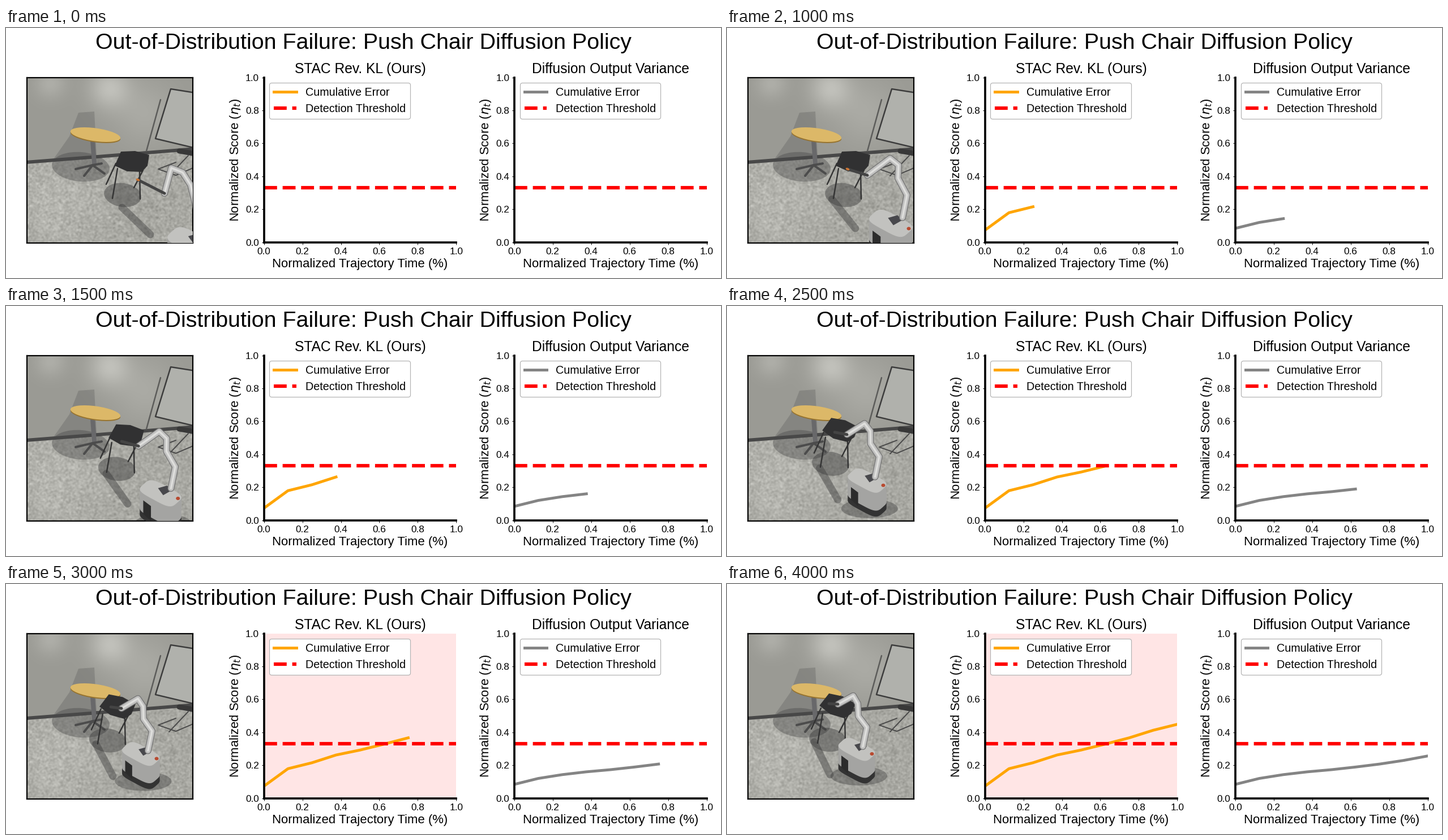
A matplotlib script for the animation above (6500 ms loop, 1263x443 px).

```python
import numpy as np
import matplotlib.pyplot as plt
from matplotlib.animation import FuncAnimation
from matplotlib.patches import Ellipse, Polygon

W, H, DPI = 1263, 443, 128
PX = 72 / DPI          # points per pixel
U = 1.232 * PX         # unit for fonts and plot lines
STEPS, FRAMES = 8, 13
THRESHOLD = 0.332

plt.rcParams["font.family"] = "Liberation Sans"
fig = plt.figure(figsize=(W / DPI, H / DPI), dpi=DPI, facecolor="white")
fig.suptitle("Out-of-Distribution Failure: Push Chair Diffusion Policy",
             x=0.5, y=0.98, fontsize=32 * U)


def add_axes(x, y, w, h):
    return fig.add_axes([x / W, 1 - (y + h) / H, w / W, h / H])


# ---------- score plots ----------
def score_plot(x, title, color):
    ax = add_axes(x, 87.5, 339.8, 292.4)
    ax.set(xlim=(0, 1), ylim=(0, 1))
    ax.set_title(title, fontsize=20 * U, pad=6 * U)
    ax.set_xlabel("Normalized Trajectory Time (%)", fontsize=18 * U, labelpad=4 * U)
    ax.set_ylabel(r"Normalized Score ($\eta_t$)", fontsize=18 * U, labelpad=4 * U)
    ax.tick_params(labelsize=14 * U, length=3.5 * U, width=0.8 * U, pad=3.5 * U)
    ax.spines[["top", "right"]].set_visible(False)
    ax.spines[["left", "bottom"]].set_linewidth(3 * U)
    curve, = ax.plot([], [], color=color, lw=4 * U, label="Cumulative Error")
    ax.axhline(THRESHOLD, color="red", ls="--", lw=5 * U, label="Detection Threshold")
    legend = ax.legend(loc="upper left", fontsize=16 * U, edgecolor="0.7", framealpha=1)
    legend.get_frame().set_linewidth(U)
    alarm = ax.axvspan(0, 1, color="red", alpha=0.1, lw=0, zorder=0.5, visible=False)
    return curve, alarm


TIME = np.linspace(0, 1, STEPS + 1)
STAC = np.array([0.074, 0.180, 0.216, 0.263, 0.293, 0.329, 0.367, 0.413, 0.449])
VARIANCE = np.array([0.085, 0.121, 0.144, 0.161, 0.174, 0.190, 0.208, 0.230, 0.257])
plots = [
    (*score_plot(455.6, "STAC Rev. KL (Ours)", "orange"), STAC),
    (*score_plot(897.8, "Diffusion Output Variance", "#848484"), VARIANCE),
]

# ---------- room, in stage pixels ----------
LEFT, TOP, SIDE = 37.4, 87.6, 293
room = add_axes(LEFT, TOP, SIDE, SIDE)
room.set(xticks=[], yticks=[])
room.spines[:].set_linewidth(2.2 * PX)


def backdrop():
    x, y = np.meshgrid(LEFT + np.arange(SIDE), TOP + np.arange(SIDE))

    def glow(cx, cy, size):
        return np.exp(-((x - cx) ** 2 + (y - cy) ** 2) / size ** 2)

    wall = 154 + 36 * glow(182, 106, 36) + 20 * glow(78, 98, 28) + 16 * glow(245, 150, 58)
    noise = np.random.default_rng(4).normal(0, 2, x.shape)
    for axis in (0, 1):
        noise = sum(np.roll(noise, k, axis) for k in range(4))
    floor = 168 + noise + 14 * glow(90, 310, 80)
    v = np.where(y < 238 - (x - LEFT) / 12, wall, floor)
    return np.clip(np.stack([v, v, v - 6], -1), 0, 255).astype(np.uint8)


room.imshow(backdrop(), extent=(LEFT, LEFT + SIDE, TOP + SIDE, TOP), aspect="auto", zorder=0)
room.set(xlim=(LEFT, LEFT + SIDE), ylim=(TOP + SIDE, TOP))


def poly(points, color, z=2, **kw):
    return room.add_patch(Polygon(points, fc=color, lw=0, zorder=z, **kw))


def oval(x, y, w, h, color, angle=0, z=2, **kw):
    return room.add_patch(Ellipse((x, y), w, h, angle=angle, fc=color,
                                  lw=0, zorder=z, **kw))


def stroke(points, color, width, z=2, **kw):
    line, = room.plot(*np.transpose(points), color=color, lw=width * PX, zorder=z,
                      solid_capstyle="round", solid_joinstyle="round", **kw)
    return line


# baseboard and table shadow
stroke([(35, 238), (150, 229), (335, 214)], "#484848", 6, 1)
poly([(128, 150), (156, 148), (160, 226), (84, 232), (112, 192)], "#505050", 1, alpha=0.28)
oval(132, 246, 102, 52, "#484848", 5, 1, alpha=0.4)

# table
stroke([(153, 200), (156, 240)], "#68686a", 8)
for foot in [(123, 250), (138, 262), (174, 258), (169, 240)]:
    stroke([(153, 243), foot], "#4c4c4c", 4)
for y, color in [(191, "#96732f"), (189, "#dcb868")]:
    oval(158, y, 89, 23, color, 8, 3)

# screen, pole and stand
stroke([(273, 127), (248, 218)], "#5c5c5a", 2.5)
poly([(291, 108), (335, 115), (335, 213), (264, 196)], "#b0b1ac")
stroke([(335, 115), (291, 108), (264, 196), (335, 213)], "#3c3c3c", 2.5)
stroke([(306, 218), (335, 223)], "#383838", 9)
stroke([(322, 226), (288, 262)], "#4a4a4a", 2)
stroke([(300, 238), (269, 250), (300, 261), (335, 246)], "#4a4a4a", 2)

# ---------- moving parts ----------
DIM = "#3c3c3c"
chair_shade = oval(0, 0, 66, 42, DIM, 8, alpha=0.45)
robot_shade = stroke([(0, 0)], DIM, 13, alpha=0.45)
base_shade = oval(0, 0, 100, 34, DIM, alpha=0.4)

CHAIR = np.array([206, 296])
SEAT = np.array([(203, 219), (228, 218), (253, 225), (250, 244), (240, 255),
                 (214, 254), (192, 244)])
LEGS = np.array([[(194, 240), (177, 277)], [(197, 249), (188, 302)],
                 [(236, 254), (237, 303)], [(242, 252), (226, 283)]])
legs = [stroke(leg, "#333333", 2.4, 4) for leg in LEGS]
seat = poly(SEAT, "#313132", 5)

# robot base: one rounded outline stacked downwards, lid first
DEPTH = 40
angle = np.linspace(0, 2 * np.pi, 60)
a, b = (1.1 * np.sign(w) * np.abs(w) ** 0.5 for w in (np.cos(angle), np.sin(angle)))
OUTLINE = np.stack([24 * a + 10 * b, 13 * a - 9 * b - 22], -1)
base = []
for drop in range(0, DEPTH + 1, 2):
    color = "#c2c2bf" if drop == 0 else "#a4a4a2" if drop < 31 else "#333333"
    base.append((poly(OUTLINE, color, 7 - drop / 100), OUTLINE + (0, drop)))
for points, color in [([(-27, -11), (-15, -2), (-15, 21), (-27, 10)], "#2c2c2c"),
                      ([(-4, -30), (10, -34), (18, -27), (4, -19)], "#48484c")]:
    base.append((poly(points, color, 7.1), np.array(points)))
button = oval(0, 0, 7, 6, "#b84a30", z=7.2)

# arm from gripper tip to foot: at rest by the table, reaching, and folded at the start
REST = [(180, 212), (196, 213), (223, 198), (231, 212), (232, 234), (247, 254), (240, 288)]
REACH = [(213, 250), (248, 261), (288, 231), (303, 243), (302, 266), (318, 296), (310, 336)]
FOLDED = [(233, 269), (280, 293), (292, 248), (312, 256), (326, 278), (334, 310), (340, 345)]
arm_lines = [stroke(REST, color, width, 8) for color, width in
             [("#737373", 12), ("#c0c0bf", 9.5), ("#dededc", 3.5)]]
gripper = stroke(REST[:2], "#444444", 5, 8)
tip = oval(0, 0, 7, 4, "#cc7433", 25, 9)


def mix(p, q, t):
    return np.array(p) * (1 - t) + np.array(q) * t


def away(step):
    """How far the robot still is from its end pose, slowing down as it arrives."""
    return (1 - step / STEPS) ** 1.7


def arm_pose(step):
    gap, reach = away(step), away(2)
    if gap < reach:
        return mix(REST, REACH, gap / reach)
    return mix(REACH, FOLDED, (gap - reach) / (1 - reach))


def draw_chair(step):
    push = 1 - ((STEPS - max(step, 2)) / (STEPS - 2)) ** 2.5
    shift = push * np.array([-28, -20])
    c, s = np.cos(0.25 * push), np.sin(0.25 * push)
    mid = SEAT.mean(0)
    seat.set_xy((SEAT - mid) @ [[c, s], [-s, c]] + mid + shift)
    for line, leg in zip(legs, LEGS + shift):
        line.set_data(*leg.T)
    chair_shade.center = CHAIR + shift


def draw_robot(step):
    gap = away(step)
    size = 1 + 0.3 * gap
    spot = mix((229, 315), (327, 408), gap)
    for part, points in base:
        part.set_xy(points * size + spot)
    button.center = spot + np.array([27, -14]) * size
    base_shade.center = spot + np.array([4, 25]) * size
    robot_shade.set_data(*mix([(154, 280), (182, 338)], [(205, 318), (255, 366)], gap).T)

    arm = arm_pose(step)
    for line in arm_lines:
        line.set_data(*arm[1:].T)
    gripper.set_data(*arm[:2].T)
    tip.center = arm[0]
    tip.set_visible(step < 3)


def draw(frame):
    step = min(frame, STEPS)
    for curve, alarm, score in plots:
        n = step + 1 if step else 0
        curve.set_data(TIME[:n], score[:n])
        alarm.set_visible(bool(score[step] > THRESHOLD))
    draw_chair(step)
    draw_robot(step)


anim = FuncAnimation(fig, draw, frames=FRAMES, init_func=lambda: draw(0),
                     interval=500, repeat=True, repeat_delay=0, blit=False)
plt.show()
```
